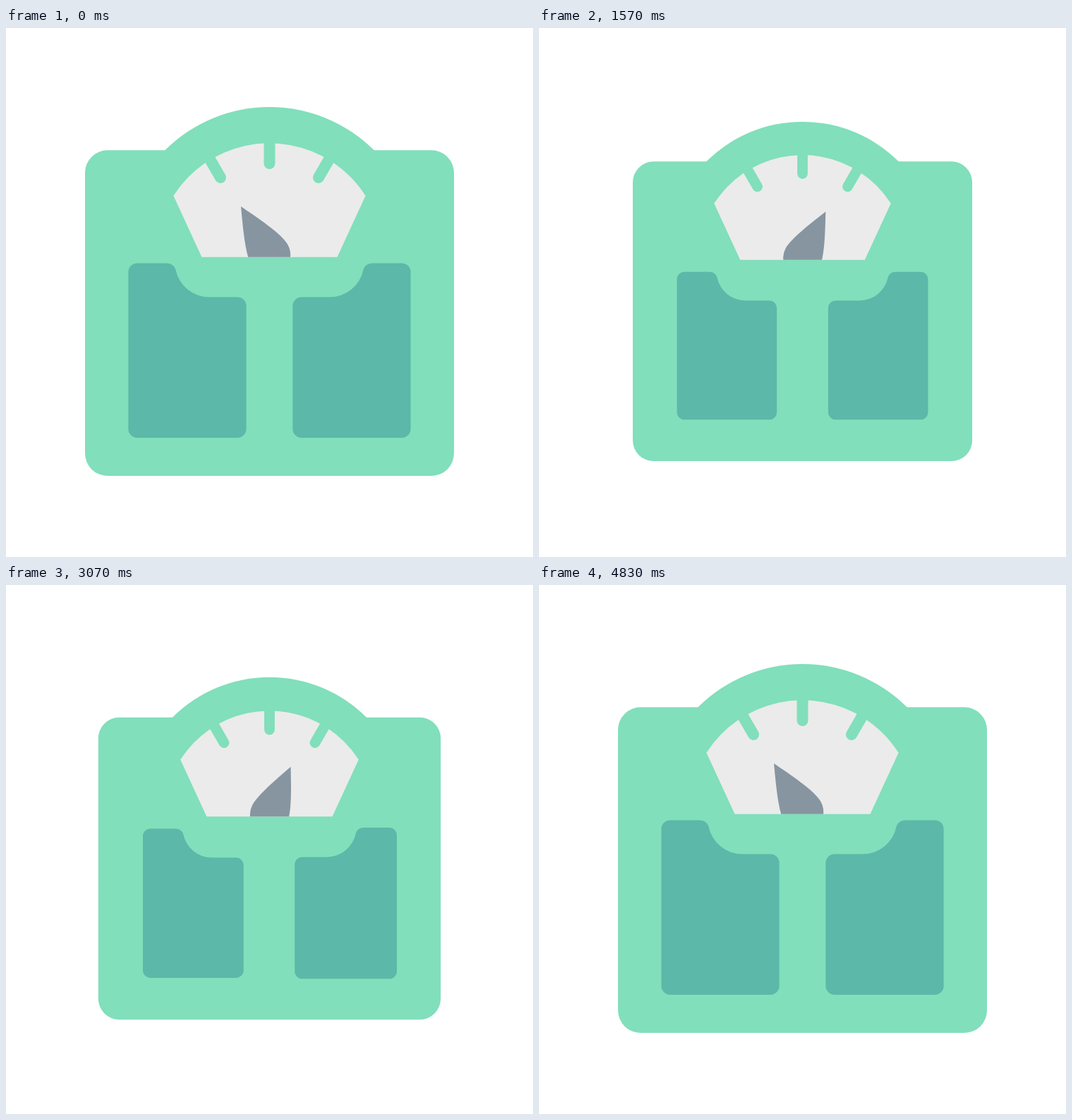
An HTML page with a canvas that plays this animation: 747 px wide and 750 px high, repeating every 5010 ms.

```html
<!DOCTYPE html>
<html lang="en">
<head>
<meta charset="utf-8">
<title>Bathroom scale</title>
<style>
  html, body { margin: 0; width: 100%; height: 100%; overflow: hidden; background: #fff; }
  canvas { display: block; }
</style>
</head>
<body>
<canvas id="stage" width="747" height="750"></canvas>
<script>
const ctx = document.getElementById('stage').getContext('2d');
const LOOP = 5010, CYCLE = 75, END = 70;
const CX = 373.5, PIVOT = 321.5, DIAL_Y = 324.8;
const GREEN = '#81dfbb', TEAL = '#5cb8a8', LIGHT = '#ebebeb', GREY = '#8795a1';

// cubic-bezier(.5, 0, .5, 1)
function ease(x) {
  if (x <= 0) return 0;
  if (x >= 1) return 1;
  let lo = 0, hi = 1;
  for (let i = 0; i < 30; i++) {
    const s = (lo + hi) / 2;
    if (1.5 * s * (1 - s) + s * s * s < x) lo = s; else hi = s;
  }
  return lo * lo * (3 - 2 * lo);
}
const soft = x => {
  const s = Math.min(1, Math.max(0, x));
  return s * s * (3 - 2 * s);
};

// The whole cycle plays forward to its middle, then mirrors back.
function pose(tick) {
  const k = tick >= END ? 0 : Math.min(tick, END - tick);
  return {
    body: 1 - 0.08 * ease(k / 22.5),
    left: 1 - 0.08 * ease(k / 10),
    right: 1 - 0.08 * ease((k - 10) / 10),
    angle: -30.6 + 56.6 * ease(k / 20) + 6 * soft((k - 20) / 15)
  };
}

function scaleAt(x, y, s) {
  ctx.translate(x, y);
  ctx.scale(s, s);
  ctx.translate(-x, -y);
}

function drawBody() {
  ctx.fillStyle = GREEN;
  ctx.beginPath();
  ctx.roundRect(112, 173.3, 523, 461.7, 32);
  ctx.fill();
  ctx.beginPath();
  ctx.arc(CX, PIVOT, 209.5, Math.PI, 0);
  ctx.fill();
}

function dialPath() {
  const a = Math.atan2(237 - DIAL_Y, 136.5);
  ctx.beginPath();
  ctx.moveTo(277.5, DIAL_Y);
  ctx.lineTo(237, 237);
  ctx.arc(CX, DIAL_Y, 161.5, Math.PI - a, a);
  ctx.lineTo(510, 237);
  ctx.lineTo(469.5, DIAL_Y);
  ctx.closePath();
}

function drawNeedle(angle) {
  ctx.save();
  ctx.clip();
  ctx.translate(CX, PIVOT);
  ctx.rotate(angle * Math.PI / 180);
  ctx.beginPath();
  ctx.moveTo(0, -79.6);
  ctx.bezierCurveTo(11, -56, 29.7, -18, 29.7, 0);
  ctx.arc(0, 0, 29.7, 0, Math.PI);
  ctx.bezierCurveTo(-29.7, -18, -11, -56, 0, -79.6);
  ctx.fillStyle = GREY;
  ctx.fill();
  ctx.restore();
}

function drawDial(angle) {
  dialPath();
  ctx.fillStyle = LIGHT;
  ctx.fill();
  drawNeedle(angle);
  ctx.strokeStyle = GREEN;
  ctx.lineWidth = 16;
  ctx.lineCap = 'round';
  ctx.beginPath();
  ctx.moveTo(CX, 150);
  ctx.lineTo(CX, 192);
  for (const side of [-1, 1]) {
    ctx.moveTo(CX + side * 91.5, 173.9);
    ctx.lineTo(CX + side * 69.5, 212);
  }
  ctx.stroke();
}

function drawPad(s, mirror) {
  ctx.save();
  if (mirror) {
    ctx.translate(747, 0);
    ctx.scale(-1, 1);
  }
  scaleAt(257, 457.2, s);
  ctx.beginPath();
  ctx.moveTo(185.5, 333.4);
  ctx.lineTo(227.5, 333.4);
  ctx.bezierCurveTo(234, 333.4, 239.3, 337.5, 240.5, 342.7);
  ctx.arc(288, 333, 48.5, Math.PI - 0.2, Math.PI / 2, true);
  ctx.arcTo(340.6, 381.5, 340.6, 394, 12.5);
  ctx.arcTo(340.6, 581, 328, 581, 12.5);
  ctx.arcTo(173.4, 581, 173.4, 568, 12.5);
  ctx.arcTo(173.4, 333.4, 186, 333.4, 12.5);
  ctx.closePath();
  ctx.fillStyle = TEAL;
  ctx.fill();
  ctx.restore();
}

function draw(ms) {
  const tick = Math.floor((ms % LOOP + 4) * 0.03) % CYCLE;
  const p = pose(tick);
  ctx.fillStyle = '#fff';
  ctx.fillRect(0, 0, 747, 750);
  ctx.save();
  scaleAt(CX, CX, p.body);
  drawBody();
  drawDial(p.angle);
  drawPad(p.left, false);
  drawPad(p.right, true);
  ctx.restore();
}

let start = null;
function loop(now) {
  if (start === null) start = now;
  draw(Math.max(0, now - start));
  requestAnimationFrame(loop);
}
draw(0);
requestAnimationFrame(loop);
</script>
</body>
</html>
```
